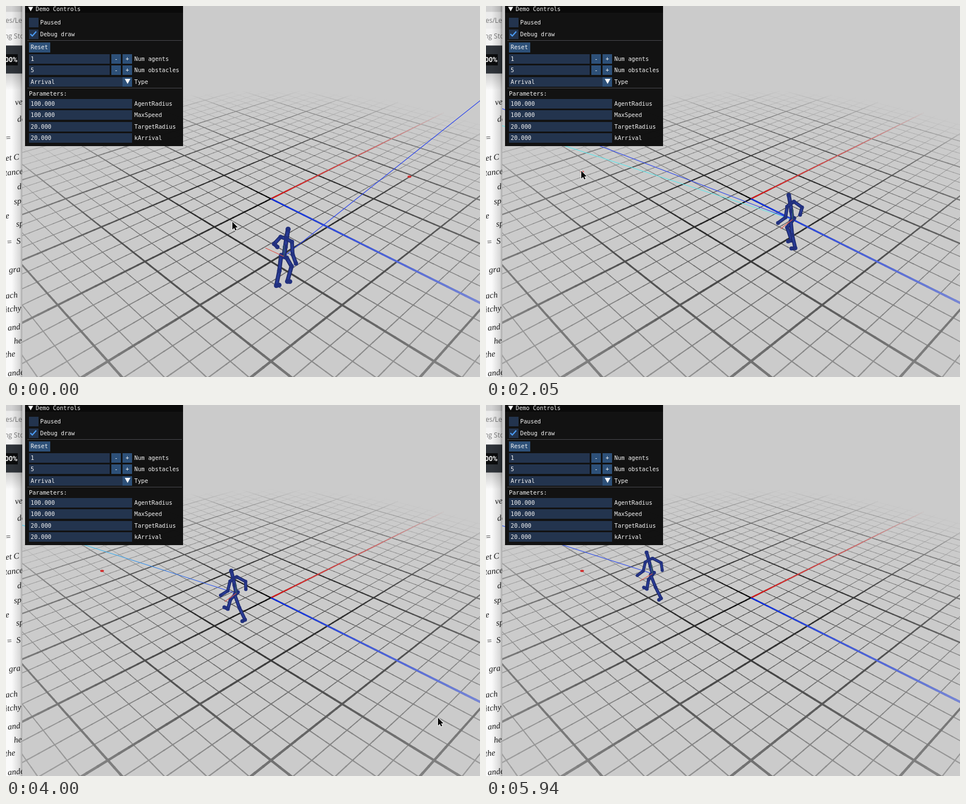
Recreate the animation shown at these times as an HTML page with a canvas. Size 846 by 662 pixels, loop 6040 ms.

```html
<!DOCTYPE html>
<html lang="en">
<head>
<meta charset="utf-8">
<title>Arrival demo</title>
<style>
html, body { margin: 0; width: 100%; height: 100%; overflow: hidden; background: #cbcbcb; }
#stage { position: absolute; left: 0; top: 0; width: 846px; height: 662px; overflow: hidden; }
canvas { position: absolute; left: 0; top: 0; }
#page { position: absolute; left: 0; top: 0; width: 29px; height: 662px; overflow: hidden;
  background: linear-gradient(#d2d2d2 0 10px, #ececec 11px 40px, #f4f4f4 41px 70px, #2f343a 71px 120px, #cfcfcf 121px, #fafafa 150px); }
#page::after { content: ""; position: absolute; inset: 0;
  background: linear-gradient(90deg, #0000 35%, #0002 85%, #0005); }
#page span { position: absolute; white-space: pre; line-height: 20px; margin-top: -10px; color: #1a1a1a;
  font: italic 15px/20px "Liberation Serif", serif; transform: rotate(-6deg); }
#page .ui { font: 12px/20px "Open Sans", sans-serif; color: #777; transform: none; }
#page .zoom { font: bold 12px/20px Roboto, sans-serif; color: #fff; background: #0b0c0d; transform: none; width: 23px; }
#panel { position: absolute; left: 34px; top: 0; width: 282px; height: 249.5px; background: rgba(15,15,15,.98);
  color: #f4f4f4; font: 10.25px/16px "DejaVu Sans Mono", monospace; }
#panel > * { position: absolute; white-space: pre; }
#panel .bar { left: 0; top: 0; width: 282px; height: 12px; background: #0a0a0a; }
#panel .field { background: #23344e; height: 17.5px; }
#panel .btn { background: #2d5078; height: 17.5px; }
#panel .rule { left: 4px; width: 276px; height: 1px; background: #48484c; }
</style>
</head>
<body>
<div id="stage">
  <canvas id="grid" width="846" height="662"></canvas>
  <canvas id="scene" width="846" height="662"></canvas>
  <div id="page"></div>
  <div id="panel"><div class="bar"></div></div>
  <canvas id="top" width="846" height="662"></canvas>
</div>
<script>
const $ = id => document.getElementById(id);
const ctx = id => $(id).getContext('2d');
const TAU = Math.PI * 2, RAD = Math.PI / 180;

function add(parent, tag, cls, x, y, text, w) {
  const e = document.createElement(tag);
  e.className = cls;
  e.style.left = x + 'px';
  e.style.top = y + 'px';
  if (w) e.style.width = w + 'px';
  e.textContent = text || '';
  parent.append(e);
}

// Page edge on the left
const page = $('page');
add(page, 'span', 'ui', -1, 26, 'es/Lec');
add(page, 'span', 'ui', -3, 54, 'ng Sto');
add(page, 'span', 'zoom', -2, 96, '00%');
[[16, 171, 've'], [20, 201, 'de'], [-1, 235, '='], [-1, 270, 'et C'], [-2, 296, 'tance'], [20, 322, 'd'],
 [14, 348, 'sp'], [-1, 374, 'e'], [18, 388, 'sp'], [1, 420, '=  S'], [5, 470, 'gra'], [-1, 516, 'ach'],
 [-2, 540, 'itchy'], [3, 573, 'and'], [14, 597, 'he'], [-2, 621, 'the'], [3, 654, 'ande']]
  .forEach(([x, y, s]) => add(page, 'span', '', x, y, s));

// Control panel
const panel = $('panel');
const label = (x, y, s) => add(panel, 'div', '', x, y - 8, s);
const box = (cls, x, y, w) => add(panel, 'div', cls, x, y - 8.5, '', w);
label(19, 5, 'Demo Controls');
[[29, 'Paused'], [50, 'Debug draw']].forEach(([y, s]) => { box('field', 7, y, 16.5); label(27, y, s); });
[61, 146].forEach(y => add(panel, 'div', 'rule', 4, y));
box('btn', 7, 73.5, 37.5);
label(10, 73, 'Reset');
[[94, '1', 'Num agents'], [114, '5', 'Num obstacles']].forEach(([y, v, s]) => {
  box('field', 7, y, 144);
  box('btn', 154, y, 17);
  box('btn', 174, y, 17);
  label(10, y, v); label(159.5, y, '-'); label(179.5, y, '+'); label(195, y, s);
});
box('field', 7, 135, 184);
box('btn', 174, 135, 17);
label(10, 135, 'Arrival');
label(195, 135, 'Type');
label(7, 156, 'Parameters:');
[['100.000', 'AgentRadius'], ['100.000', 'MaxSpeed'], ['20.000', 'TargetRadius'], ['20.000', 'kArrival']]
  .forEach(([v, s], i) => {
    const y = Math.round(174 + i * 20.3);
    box('field', 7, y, 184); label(10, y, v); label(195, y, s);
  });

// Camera: s runs right, d towards the viewer, h up
const CX = 473, SCALE = 91.6;
function project(s, d, h = 0) {
  const w = 1 - .0927 * d - .0511 * h;
  return { x: CX + SCALE * s / w, y: (344 + 13.73 * d - 97.5 * h) / w, w, d };
}
const HIP = .5;
function hipToWorld(x, y) {
  const d = (.9745 * y - 295.25) / (13.73 + .0927 * y);
  return { s: (x - CX) * (.9745 - .0927 * d) / SCALE, d };
}

function line(c, a, b, color, width) {
  c.strokeStyle = color;
  c.lineWidth = width;
  c.beginPath();
  c.moveTo(a.x, a.y);
  c.lineTo(b.x, b.y);
  c.stroke();
}

function drawGrid() {
  const c = ctx('grid'), STEP = .1, CELLS = 4;
  c.fillStyle = '#cbcbcb';
  c.fillRect(0, 0, 846, 662);
  const rule = (k, alongX, rgb, strength, width, from) => {
    for (let t = from; t < 5; t += STEP) {
      const fade = 1 - Math.hypot(k, t + STEP / 2) / 4.95;
      if (fade <= 0) continue;
      const m = strength * Math.pow(fade, .9);
      const at = u => alongX ? project(u + k, k - u) : project(k + u, u - k);
      const a = at(t), b = at(t + STEP * 1.15);
      line(c, a, b, `rgb(${rgb.map(v => Math.round(203 + (v - 203) * m))})`, width / a.w ** 1.5);
    }
  };
  for (const major of [false, true])
    for (let i = -5 * CELLS; i <= 5 * CELLS; i++) {
      if ((i % CELLS === 0) !== major) continue;
      for (const dir of [true, false])
        rule(i / CELLS, dir, [8, 8, 8], major ? 1 : .72, major ? 2.2 : 1.05, -5);
    }
  rule(0, true, [222, 26, 26], 1, 2.2, 0);
  rule(0, false, [10, 45, 225], 1, 2.4, 0);
}

function drawPanelMarks() {
  const c = ctx('top');
  const tri = (x, y, r) => {
    c.beginPath();
    c.moveTo(x - r, y - r * .8); c.lineTo(x + r, y - r * .8); c.lineTo(x, y + r); c.fill();
  };
  c.fillStyle = '#fff';
  tri(44, 5, 4.5);
  tri(217, 134, 5);
  c.strokeStyle = '#4c9cf5';
  c.lineWidth = 2.2;
  c.beginPath();
  c.moveTo(43.5, 50); c.lineTo(47, 53.5); c.lineTo(54, 45.5);
  c.stroke();
}

// Linear interpolation through [step, ...values] rows
function track(rows, i) {
  let n = 0;
  while (n < rows.length - 2 && i >= rows[n + 1][0]) n++;
  const a = rows[n], b = rows[n + 1];
  const u = Math.min(1, Math.max(0, (i - a[0]) / (b[0] - a[0])));
  return a.slice(1).map((v, j) => v + (b[j + 1] - v) * u);
}
const hipPath = [[0, 496, 447], [6, 541, 414], [9, 563, 397], [10, 568, 392], [11, 567, 388], [13, 547, 381],
  [18, 493, 362], [27, 411, 336], [32, 366, 318], [40, 297, 301]];
const heading = [[0, -52], [8, -53], [9, -60], [10, -80], [11, -106], [12, -130], [13, -143], [14, -148], [40, -148]];
const cyanMix = [[0, 0, 0], [6, .1, 1], [9, 1, 1], [18, 1, 1], [27, 0, .8], [32, 0, .7], [40, 0, .12]];
const mouse = [[0, 404, 385], [6, 200, 364], [8, 170, 294], [19, 170, 294], [23, 771, 556], [27, 771, 558]];

const tone = m => `rgb(${[45 + 35 * m, 70 + 165 * m, 235]})`;

function drawRunner(c, hip, ang, phase) {
  const cos = Math.cos(ang), sin = Math.sin(ang);
  // f forward, l left, h up
  const at = ([f, l, h]) => project(hip.s + f * cos + l * sin, hip.d + f * sin - l * cos, h);
  const swing = (p, len, a, out = 0) =>
    [p[0] + len * Math.sin(a * RAD), p[1] + out, p[2] - Math.sqrt(len * len - out * out) * Math.cos(a * RAD)];
  const bones = [];
  const chain = (width, ...pts) => bones.push({ width, pts: pts.map(at) });

  chain(6, [0, 0, HIP], [.03, 0, .65], [.055, 0, .78], [.09, 0, .92]);
  for (const side of [1, -1]) {
    const p = (phase + (side > 0 ? 0 : .5)) % 1;
    const hipJoint = [0, side * .05, HIP];
    const thigh = 10 + 36 * Math.cos(TAU * p);
    const shin = thigh - 8 - 70 * Math.max(0, Math.sin(TAU * (p - .45)));
    const knee = swing(hipJoint, .26, thigh);
    const ankle = swing(knee, .24, shin);
    const toe = swing(ankle, .08, shin + 80);
    chain(5.5, [0, 0, HIP], hipJoint, knee, ankle, toe);

    const reach = -25 * Math.cos(TAU * p);
    const shoulder = [.05, side * .1, .77];
    const elbow = swing(shoulder, .17, reach - 25, side * .09);
    const hand = swing(elbow, .18, reach + 28, side * .03);
    chain(5, [.05, 0, .78], shoulder, elbow, hand);
  }
  const depth = b => b.pts.reduce((t, p) => t + p.d, 0) / b.pts.length;
  bones.sort((a, b) => depth(a) - depth(b));
  c.lineCap = c.lineJoin = 'round';
  for (const { width, pts } of bones) {
    const w = width / pts[0].w;
    for (const [color, k] of [['#1a2560', 1], ['#293b94', .62]]) {
      c.strokeStyle = color;
      c.lineWidth = w * k;
      c.beginPath();
      pts.forEach(p => c.lineTo(p.x, p.y));
      c.stroke();
    }
    for (const p of pts) {
      c.fillStyle = '#22317f';
      c.beginPath();
      c.arc(p.x, p.y, w * .56, 0, TAU);
      c.fill();
    }
  }
  c.lineCap = 'butt';
}

function drawCursor(c, x, y) {
  c.beginPath();
  [[0, 0], [0, 14], [3.2, 11], [5.4, 15.6], [7.6, 14.6], [5.5, 10.2], [9.6, 10]].forEach(([a, b]) => c.lineTo(x + a, y + b));
  c.closePath();
  c.lineJoin = 'round';
  c.strokeStyle = '#f4f4f4';
  c.lineWidth = 2;
  c.stroke();
  c.fillStyle = '#080808';
  c.fill();
}

const scene = ctx('scene');
function draw(i) {
  const c = scene;
  c.clearRect(0, 0, 846, 662);
  const goal = i < 9 ? [720, 304.5] : [171.5, 296];
  c.fillStyle = '#d23030';
  c.beginPath();
  c.ellipse(goal[0], goal[1], 3.4, 2, 0, 0, TAU);
  c.fill();

  const hip = hipToWorld(...track(hipPath, i));
  const ang = track(heading, i)[0] * RAD;
  const root = project(hip.s, hip.d, HIP);
  const ray = (a, len) => project(hip.s + len * Math.cos(a), hip.d + len * Math.sin(a), HIP);
  const far = ray(ang, 20);
  if (i >= 9 && i < 14) {
    line(c, root, ray(-147.7 * RAD, 20), '#62e6ea', 1.2);
    line(c, root, far, tone(0), 1.2);
  } else {
    const k = 300 / Math.hypot(far.x - root.x, far.y - root.y);
    const g = c.createLinearGradient(root.x, root.y, root.x + (far.x - root.x) * k, root.y + (far.y - root.y) * k);
    track(cyanMix, i).forEach((m, n) => g.addColorStop(n, tone(m)));
    line(c, root, far, g, 1.2);
  }
  drawRunner(c, hip, ang, ((i + 4.4) % 13) / 13);
  line(c, root, ray(ang - Math.PI / 2, .34), '#e0574c', 1.1);
  line(c, root, project(hip.s, hip.d, HIP + .2), '#4c8a4a', .8);
  if (i < 28) drawCursor(c, ...track(mouse, i));
}

// Steps last 150 ms, a few of them 140 ms
const shortSteps = [2, 5, 8, 11, 14, 35];
const starts = [0];
for (let i = 0; i < 40; i++) starts.push(starts[i] + (shortSteps.includes(i) ? 140 : 150));

let shown = -1;
const t0 = performance.now();
function tick() {
  const t = (performance.now() - t0) % 6040;
  let i = 40;
  while (starts[i] > t) i--;
  if (i !== shown) draw(shown = i);
  requestAnimationFrame(tick);
}
drawGrid();
drawPanelMarks();
tick();
</script>
</body>
</html>
```
